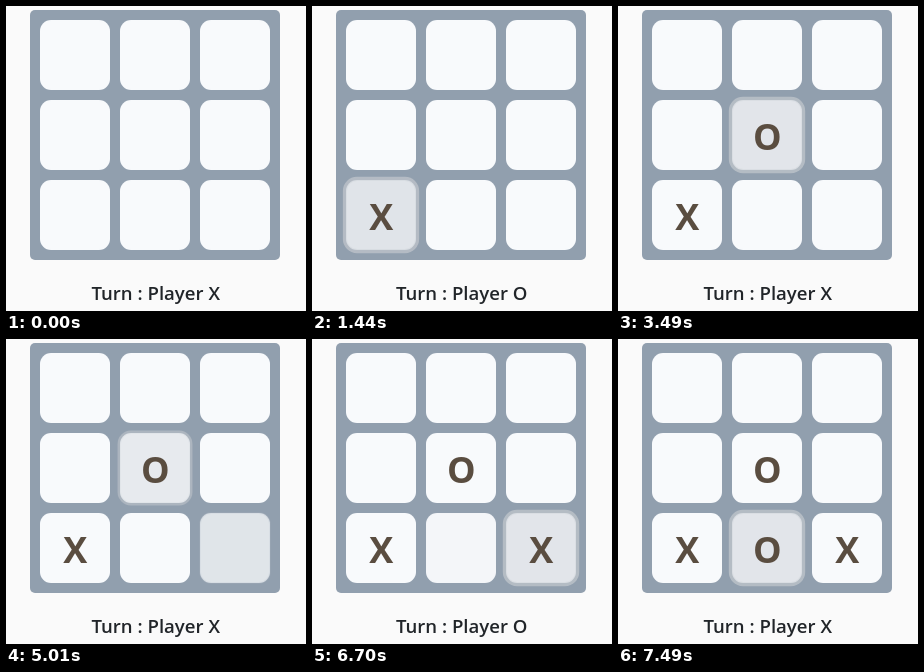
An HTML page with a canvas for the animation above (8 s loop, 300 by 305 pixels).

```html
<!DOCTYPE html>
<html lang="en">
<head>
<meta charset="utf-8">
<title>Tic-tac-toe</title>
<style>
  html, body { margin: 0; width: 100%; height: 100%; overflow: hidden; background: #fafafa; }
  canvas { display: block; width: 300px; height: 305px; }
</style>
</head>
<body>
<canvas id="stage"></canvas>
<script>
const W = 300, H = 305, LOOP = 8000;
const canvas = document.getElementById('stage');
const ctx = canvas.getContext('2d');
const dpr = window.devicePixelRatio || 1;
canvas.width = W * dpr;
canvas.height = H * dpr;

// Button states: fill RGB, border RGB, focus ring strength
const IDLE = [248, 250, 252, 248, 250, 252, 0];
const HOVER = [226, 230, 234, 218, 224, 229, 0];
const PRESSED = [218, 224, 229, 211, 217, 223, 1];
const FOCUS = [226, 229, 234, 218, 222, 227, 1];

const moves = [
  { cell: 6, mark: 'X', hover: 968, down: 1277, up: 1375 },
  { cell: 4, mark: 'O', hover: 2892, down: 3245, up: 3340 },
  { cell: 8, mark: 'X', hover: 4702, down: 4985, up: 5070 },
  { cell: 7, mark: 'O', hover: 6690, down: 6975, up: 7060 }
];

// Each step: start time, state to reach, duration
moves.forEach((m, i) => {
  m.steps = [[m.hover, HOVER, 75], [m.down, PRESSED, 150], [m.up, FOCUS, 150]];
  const next = moves[i + 1];
  if (next) m.steps.push([next.down, IDLE, 150]);
});

const bez = (a, b, u) => 3 * a * u * (1 - u) ** 2 + 3 * b * u * u * (1 - u) + u ** 3;

// CSS "ease": cubic-bezier(.25, .1, .25, 1)
function ease(x) {
  if (x <= 0) return 0;
  if (x >= 1) return 1;
  let lo = 0, hi = 1;
  for (let i = 0; i < 24; i++) {
    const mid = (lo + hi) / 2;
    if (bez(0.25, 0.25, mid) < x) lo = mid; else hi = mid;
  }
  return bez(0.1, 1, lo);
}

// Every transition departs from wherever the previous one had got to
function stateAt(steps, t, n = steps.length - 1) {
  while (n >= 0 && steps[n][0] > t) n--;
  if (n < 0) return IDLE;
  const [start, to, length] = steps[n];
  const from = stateAt(steps, start, n - 1);
  const p = ease((t - start) / length);
  return from.map((v, i) => v + (to[i] - v) * p);
}

function box(x, y, size, radius, fill) {
  ctx.beginPath();
  ctx.roundRect(x, y, size, size, radius);
  ctx.fillStyle = fill;
  ctx.fill();
}

const rgb = c => `rgb(${c.map(Math.round).join(',')})`;

function drawCell(i, t) {
  const x = 34 + (i % 3) * 80, y = 14 + Math.floor(i / 3) * 80;
  const move = moves.find(m => m.cell === i);
  const s = move ? stateAt(move.steps, t) : IDLE;
  const ring = s[6];
  if (ring > 0) {
    const w = 3.2 * ring;
    box(x - w, y - w, 70 + 2 * w, 11 + w, `rgba(216,217,219,${ring / 2})`);
  }
  box(x, y, 70, 11, rgb(s.slice(3, 6)));
  box(x + 1, y + 1, 68, 10, rgb(s.slice(0, 3)));
  if (move && t >= move.up) {
    ctx.font = '700 36px "Open Sans", "Noto Sans", sans-serif';
    ctx.fillStyle = '#5a4d40';
    ctx.fillText(move.mark, x + 35.3, y + 49.5);
  }
}

function draw(t) {
  ctx.setTransform(dpr, 0, 0, dpr, 0, 0);
  ctx.fillStyle = '#fafafa';
  ctx.fillRect(0, 0, W, H);
  ctx.textAlign = 'center';
  box(24, 4, 250, 5, '#919fae');
  for (let i = 0; i < 9; i++) drawCell(i, t);

  const played = moves.filter(m => t >= m.up).length;
  ctx.font = '600 18.6px "Open Sans", "Noto Sans", sans-serif';
  ctx.fillStyle = '#212529';
  ctx.fillText('Turn : Player ' + 'XO'[played % 2], 149.7, 294);
}

const begin = performance.now();
function tick() {
  draw((performance.now() - begin) % LOOP);
  requestAnimationFrame(tick);
}
tick();
</script>
</body>
</html>
```
